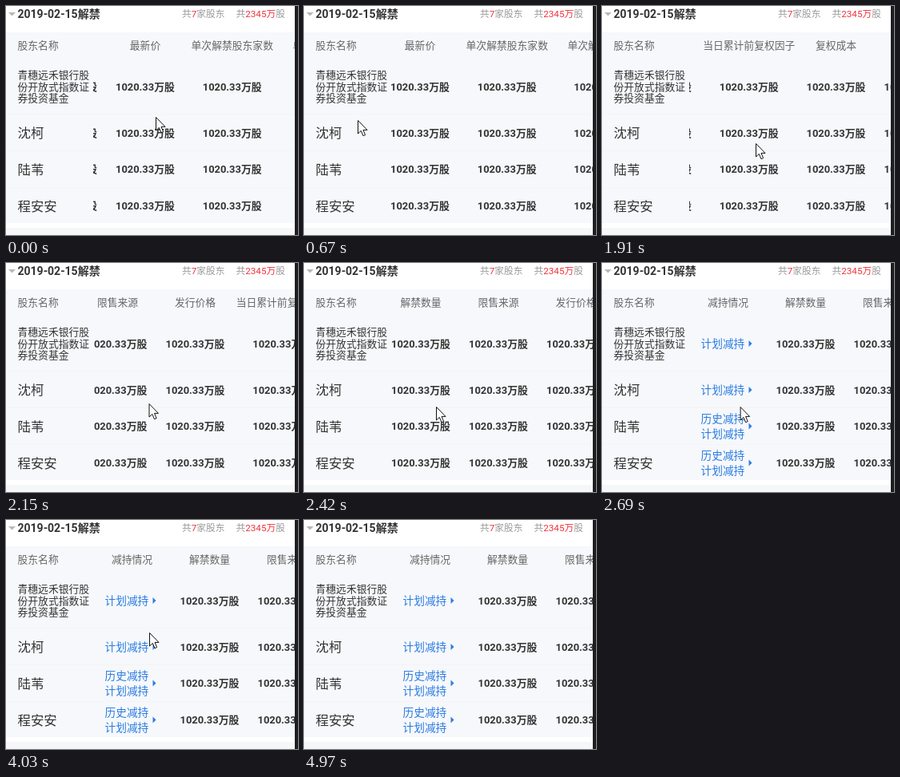
An HTML page for the animation above (5370 ms loop, 365 px wide and 287 px high).

```html
<!DOCTYPE html>
<html lang="zh-CN">
<head>
<meta charset="utf-8">
<style>
  html, body { margin: 0; width: 100%; height: 100%; overflow: hidden; background: #fff; }
  svg { display: block; width: 365px; height: 287px; }
  text { font-family: Roboto, "Noto Sans CJK SC", "Noto Sans CJK", sans-serif; white-space: pre; }
  .title { font-size: 14px; font-weight: 700; fill: #333; }
  .note { font-size: 11.7px; fill: #999; }
  .note tspan { fill: #f0323c; }
  .head { font-size: 12.8px; fill: #666; }
  .fund { font-size: 12.8px; fill: #333; }
  .name { font-size: 16.4px; fill: #333; }
  .value { font-size: 12.9px; font-weight: 700; fill: #333; }
  .link { font-size: 13.7px; fill: #2b7de3; }
  .mid { text-anchor: middle; }
</style>
</head>
<body>
<svg viewBox="0 0 365 287">
  <defs>
    <clipPath id="window"><rect x="109" y="33" width="252" height="239"/></clipPath>
  </defs>
  <rect width="365" height="287" fill="#fff"/>
  <rect y="33" width="361" height="239" fill="#f7f8fb"/>
  <rect y="278" width="361" height="9" fill="#f5f7f9"/>
  <path d="M0 135.5H361M0 181.5H361M0 227.5H361" stroke="#f2f4f7"/>
  <path d="M3 8H12L7.5 12.5Z" fill="#b8b8b8"/>
  <text class="title" x="14.5" y="15">2019-02-15解禁</text>
  <text class="note" x="220" y="14.4">共<tspan>7</tspan>家股东</text>
  <text class="note" x="287.5" y="14.4">共<tspan>2345万</tspan>股</text>
  <g id="fixed"></g>
  <g clip-path="url(#window)">
    <g id="strip"></g>
    <path id="glow" d="M361 33H336Q326 152 336 272H361Z" fill-opacity=".016"/>
  </g>
  <rect x="361" width="4" height="287" fill="#1d1e20"/>
  <path id="cursor" d="M.5 .5V17L4.3 13.4L7 19.7L9.6 18.6L7 12.4H12Z" fill="#fff" stroke="#111" stroke-linejoin="round"/>
</svg>
<script>
const LOOP = 5370, TICK = 135.6, PHASE = 33;
const $ = id => document.getElementById(id);

function add(parent, tag, attrs, content = '') {
  const node = document.createElementNS('http://www.w3.org/2000/svg', tag);
  for (const key in attrs) node.setAttribute(key, attrs[key]);
  node.textContent = content;
  parent.append(node);
}
const label = (parent, cls, x, y, content) => add(parent, 'text', { class: cls, x, y }, content);

const fixed = $('fixed'), strip = $('strip'), glow = $('glow'), cursor = $('cursor');
const rowCenters = [101, 159, 204.5, 250.5];

label(fixed, 'head', 14.5, 53.8, '股东名称');
['青穗远禾银行股', '份开放式指数证', '券投资基金'].forEach((line, i) =>
  label(fixed, 'fund', 14.5, 91 + i * 14.7, line));
['沈柯', '陆苇', '程安安'].forEach((name, i) =>
  label(fixed, 'name', 14.5, rowCenters[i + 1] + 6.2, name));

// Columns are laid side by side; long titles get a wider one
const titles = ['减持情况', '解禁数量', '限售来源', '发行价格', '当日累计前复权因子',
  '复权成本', '最新价', '单次解禁股东家数', '单次解禁总股数'];
let left = 109;
titles.forEach((title, i) => {
  const width = title.length > 4 ? 120.5 : 97;
  const center = left + width / 2;
  left += width;
  label(strip, 'head mid', center, 53.8, title);
  if (i) rowCenters.forEach(y => label(strip, 'value mid', center, y + 4.7, '1020.33万股'));
});
rowCenters.forEach((y, i) => {
  const lines = i < 2 ? ['计划减持'] : ['历史减持', '计划减持'];
  lines.forEach((line, n) =>
    label(strip, 'link', 123.5, y + 5.2 + (n - (lines.length - 1) / 2) * 19, line));
  add(strip, 'path', { d: `M183.5 ${y - 4}l4 4l-4 4z`, fill: '#2b7de3' });
});

// Key points: [tick, value...]
const scroll = [[4, 589], [5, 618], [6, 688.5], [12, 688.5], [14, 373.5], [16, 212], [18, 108.5], [20, 0]];
const pointer = [
  [0, 187, 139], [1, 170, 143], [3, 268, 143], [4, 268, 143], [5, 67, 143],
  [9, 112, 150], [12, 112, 150], [14, 192, 172], [18, 165, 180],
  [23, 184, 180], [28, 184, 180], [29, 179, 141], [31, 170, -30]
];

function between(keys, tick) {
  const next = keys.findIndex(key => key[0] > tick);
  if (next < 1) return keys.at(next).slice(1);
  const a = keys[next - 1], b = keys[next];
  const part = (tick - a[0]) / (b[0] - a[0]);
  return a.slice(1).map((value, i) => value + (b[i + 1] - value) * part);
}

// The picture refreshes once per tick
function draw() {
  const tick = Math.floor((performance.now() % LOOP + PHASE) / TICK);
  const [offset] = between(scroll, tick);
  const [x, y] = between(pointer, tick);
  strip.setAttribute('transform', `translate(${-offset} 0)`);
  cursor.setAttribute('transform', `translate(${x} ${y})`);
  glow.setAttribute('opacity', offset === 688.5 ? 1 : 0);
  requestAnimationFrame(draw);
}
draw();
</script>
</body>
</html>
```
